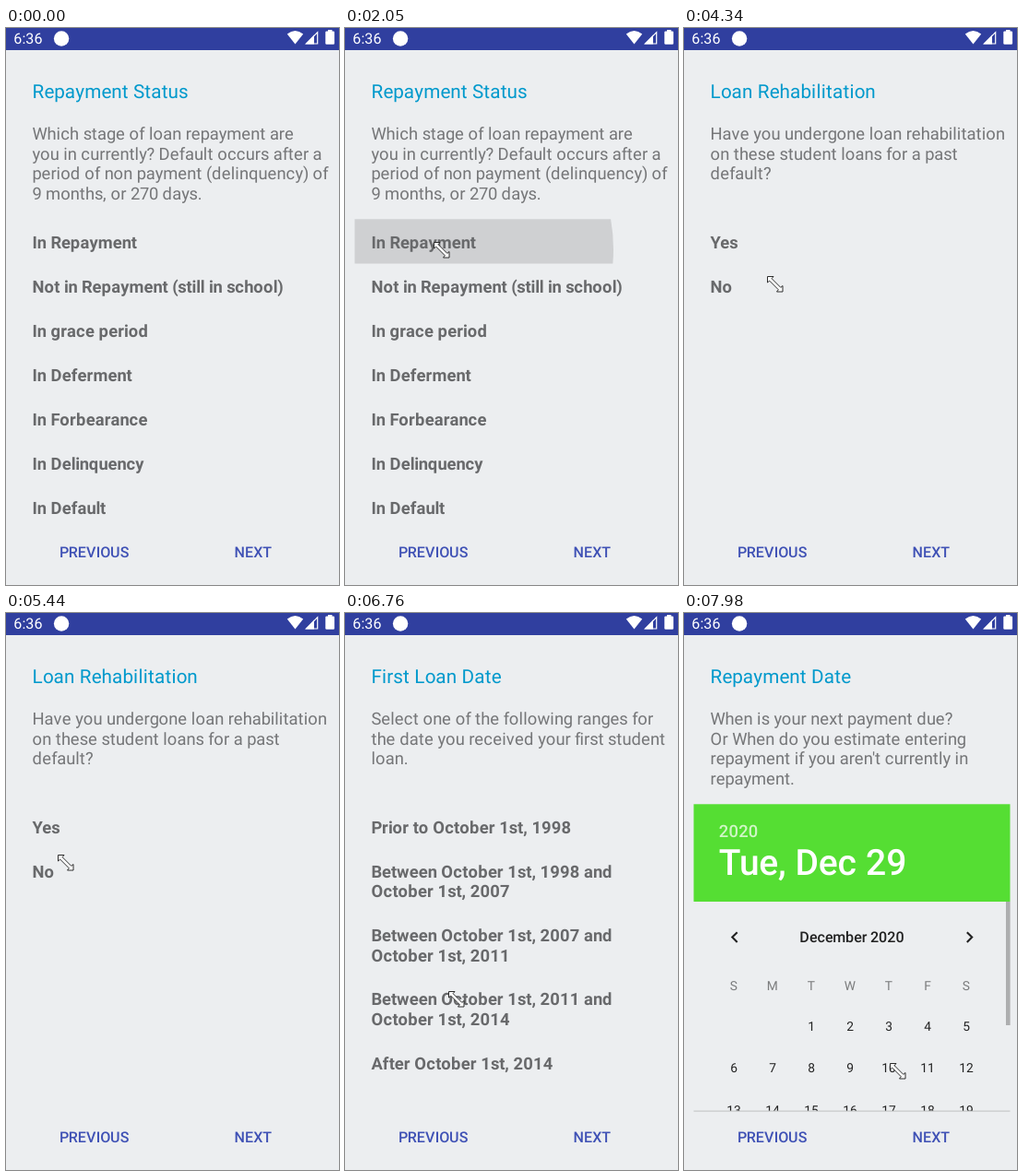
Recreate the animation shown at these times as an HTML page with a canvas. Size 361x604 px, loop 8 s.

```html
<!DOCTYPE html>
<html lang="en">
<head>
<meta charset="utf-8">
<title>Loan questionnaire</title>
<style>
html, body { margin: 0; width: 100%; height: 100%; overflow: hidden; background: #eceef0; }
canvas { display: block; width: 361px; height: 604px; }
</style>
</head>
<body>
<canvas id="stage"></canvas>
<script>
const W = 361, H = 604, LOOP = 8000;
const SCALE = 0.766;           // device pixels to stage pixels
const LEFT = 28.5, PITCH = 21.5, EDGE = 10.5, LIST_TOP = 207.3, LIST_W = 343;
const TICK = 76, HALO = 230;   // pointer cadence and halo time in ms
const canvas = document.getElementById('stage');
const ctx = canvas.getContext('2d');
const dpr = window.devicePixelRatio || 1;
canvas.width = W * dpr;
canvas.height = H * dpr;

const between = (a, b) => [`Between October 1st, ${a} and`, `October 1st, ${b}`];

// Each page lasts until its time; ripple is when the picked row is pressed
const pages = [
  { until: 2140, ripple: 2050, pick: 0, title: 'Repayment Status',
    body: ['Which stage of loan repayment are', 'you in currently? Default occurs after a',
      'period of non payment (delinquency) of', '9 months, or 270 days.'],
    options: [['In Repayment'], ['Not in Repayment (still in school)'], ['In grace period'],
      ['In Deferment'], ['In Forbearance'], ['In Delinquency'], ['In Default']] },
  { until: 3950, ripple: 3720, pick: 1, title: 'Deceased Borrower',
    body: ['Are you a parent borrower, next of kin,', 'or other entity who thinks they may be',
      'financially responsible for the student', 'loans of an individual who has died?'],
    options: [['Yes'], ['No']] },
  { until: 5830, ripple: 5680, pick: 1, title: 'Loan Rehabilitation',
    body: ['Have you undergone loan rehabilitation', 'on these student loans for a past', 'default?'],
    options: [['Yes'], ['No']] },
  { until: 7390, ripple: 7150, pick: 3, title: 'First Loan Date',
    body: ['Select one of the following ranges for', 'the date you received your first student', 'loan.'],
    options: [['Prior to October 1st, 1998'], between(1998, 2007), between(2007, 2011),
      between(2011, 2014), ['After October 1st, 2014']] },
  { until: LOOP, title: 'Repayment Date',
    body: ['When is your next payment due?', 'Or When do you estimate entering',
      "repayment if you aren't currently in", 'repayment.'] }
];

// Pointer glides; bow bends the path vertically
const entry = { x: 279, y: 510, at: 360 };
const glides = [
  { at: 360, ms: 608, x: 104, y: 239, bow: -200 },
  { at: 1045, ms: 228, x: 96, y: 232 },
  { at: 2775, ms: 608, x: 63, y: 276, bow: 14 },
  { at: 4104, ms: 228, x: 90, y: 269 },
  { at: 4408, ms: 380, x: 90, y: 231 },
  { at: 5065, ms: 304, x: 56, y: 262 },
  { at: 5984, ms: 760, x: 112, y: 410 },
  { at: 7674, ms: 304, x: 223, y: 488 }
];

function pointerAt(t) {
  let { x, y } = entry;
  for (const g of glides) {
    if (t < g.at) break;
    const p = Math.min(1, Math.floor((t - g.at) / TICK) * TICK / g.ms);
    const u = p * p * (3 - 2 * p);
    x += (g.x - x) * u;
    y += (g.y - y) * u + (g.bow || 0) * Math.sin(Math.PI * u);
  }
  return { x, y };
}

// Glyph advances and kerning snap to whole device pixels
const layouts = new Map();
function layout(str) {
  const key = ctx.font + str;
  if (!layouts.has(key)) {
    const width = s => ctx.measureText(s).width;
    const stops = [0];
    [...str].forEach((ch, i) => {
      const next = str[i + 1] || '';
      const kern = width(ch + next) - width(ch) - width(next);
      stops.push(stops[i] + Math.round(width(ch)) + Math.round(kern));
    });
    layouts.set(key, stops);
  }
  return layouts.get(key);
}

function text(str, x, y, px, color, weight = 400, centered = false) {
  ctx.save();
  ctx.translate(x, y);
  ctx.scale(SCALE, SCALE);
  ctx.font = `${weight} ${px}px Roboto, sans-serif`;
  ctx.fillStyle = color;
  const stops = layout(str);
  const shift = centered ? stops[str.length] / 2 : 0;
  [...str].forEach((ch, i) => ctx.fillText(ch, stops[i] - shift, 0));
  ctx.restore();
}

function rect(x, y, w, h, color) {
  ctx.fillStyle = color;
  ctx.fillRect(x, y, w, h);
}

function disc(x, y, r, color) {
  ctx.fillStyle = color;
  ctx.beginPath();
  ctx.arc(x, y, r, 0, Math.PI * 2);
  ctx.fill();
}

function poly(points, closed = true) {
  ctx.beginPath();
  points.forEach(([x, y]) => ctx.lineTo(x, y));
  if (closed) ctx.closePath();
}

function stroke(color, width) {
  ctx.strokeStyle = color;
  ctx.lineWidth = width;
  ctx.stroke();
}

function clipped(x, y, w, h, paint) {
  ctx.save();
  ctx.beginPath();
  ctx.rect(x, y, w, h);
  ctx.clip();
  paint();
  ctx.restore();
}

function statusBar() {
  rect(0, 0, W, 24, '#303f9f');
  text('6:36', 8.2, 17, 21, '#fff');
  disc(60.1, 11.5, 8.2, '#fff');
  ctx.beginPath();
  ctx.moveTo(313.5, 17.6);
  ctx.lineTo(304.8, 6.6);
  ctx.quadraticCurveTo(313.5, -0.6, 322.2, 6.6);
  ctx.fill();
  poly([[324.5, 17.5], [334, 17.5], [334, 7.6]]);
  ctx.fill();
  poly([[325.5, 17], [337.7, 17], [337.7, 4.6]]);
  stroke('#fff', 1.2);
  rect(349, 2, 4.5, 3, '#fff');
  ctx.beginPath();
  ctx.roundRect(346.3, 3.6, 9.8, 14.2, 1.2);
  ctx.fill();
}

function list(page, t, { x, y }) {
  let top = LIST_TOP;
  page.options.forEach((lines, i) => {
    const height = 48.1 + (lines.length - 1) * 21.3;
    const age = t - page.ripple;
    if (i === page.pick && age >= 0) {
      const radius = 187 + Math.floor(age / 70) * 130;
      clipped(EDGE, top, LIST_W, height, () => disc(x + 8, y + 8, radius, 'rgba(0,0,0,.125)'));
    }
    lines.forEach((line, j) => text(line, LEFT, top + 31.2 + j * PITCH, 24, '#68696b', 700));
    top += height;
  });
}

function chevron(x, dir) {
  poly([[x - 2.7 * dir, 346.2], [x + 2.7 * dir, 351.6], [x - 2.7 * dir, 357]], false);
  stroke('#222', 2.1);
}

function calendar() {
  const colX = c => 54 + c * 42;
  rect(EDGE, LIST_TOP, LIST_W, 105.7, '#55de33');
  text('2020', 37.7, 242.7, 24, 'rgba(255,255,255,.72)', 500);
  text('Tue, Dec 29', 37.7, 284, 51, '#fff', 500);
  chevron(55, -1);
  chevron(309.5, 1);
  text('December 2020', 182, 357, 21, '#222', 500, true);
  [...'SMTWTFS'].forEach((d, c) => text(d, colX(c), 409, 18, '#7b7c7d', 400, true));
  clipped(EDGE, 313, LIST_W, 227, () => {
    for (let day = 1; day < 20; day++) {
      const cell = day + 1;
      text(String(day), colX(cell % 7), 452.5 + Math.floor(cell / 7) * 45.6, 18, '#222', 400, true);
    }
  });
  rect(349, 313, 4.6, 134, '#adaeaf');
  rect(EDGE, 539.6, LIST_W, 1, '#bfc0c1');
}

// Double arrow, mirrored about its diagonal
const half = [[6.5, 0], [4.6, 2.2], [14.3, 11.9], [16.5, 10]];
const arrow = [[0, 0], ...half, [16.5, 16.5], ...half.map(([x, y]) => [y, x]).reverse()];

function pointer({ x, y }, halo) {
  ctx.save();
  ctx.translate(x + 0.5, y + 0.5);
  poly(arrow);
  ctx.fillStyle = '#fff';
  ctx.fill();
  stroke('#222', 0.95);
  if (halo) disc(7.7, 8, 12, 'rgba(255,252,50,.66)');
  ctx.restore();
}

function draw(t) {
  ctx.setTransform(dpr, 0, 0, dpr, 0, 0);
  ctx.textRendering = 'geometricPrecision';
  rect(0, 0, W, H, '#eceef0');
  statusBar();

  const page = pages.find(p => t < p.until);
  const spot = pointerAt(t);
  text(page.title, LEFT, 76.3, 27, '#0099cc');
  page.body.forEach((line, i) => text(line, LEFT, 121 + i * PITCH, 24, '#757678'));
  if (page.options) list(page, t, spot);
  else calendar();
  text('PREVIOUS', 95.8, 574.2, 21, '#3f51b5', 500, true);
  text('NEXT', 267.8, 574.2, 21, '#3f51b5', 500, true);

  const halo = t >= page.ripple - HALO && t < page.ripple;
  if (t >= entry.at) pointer(spot, halo);
}

const start = performance.now();
function tick() {
  draw((performance.now() - start) % LOOP);
  requestAnimationFrame(tick);
}
tick();
</script>
</body>
</html>
```
